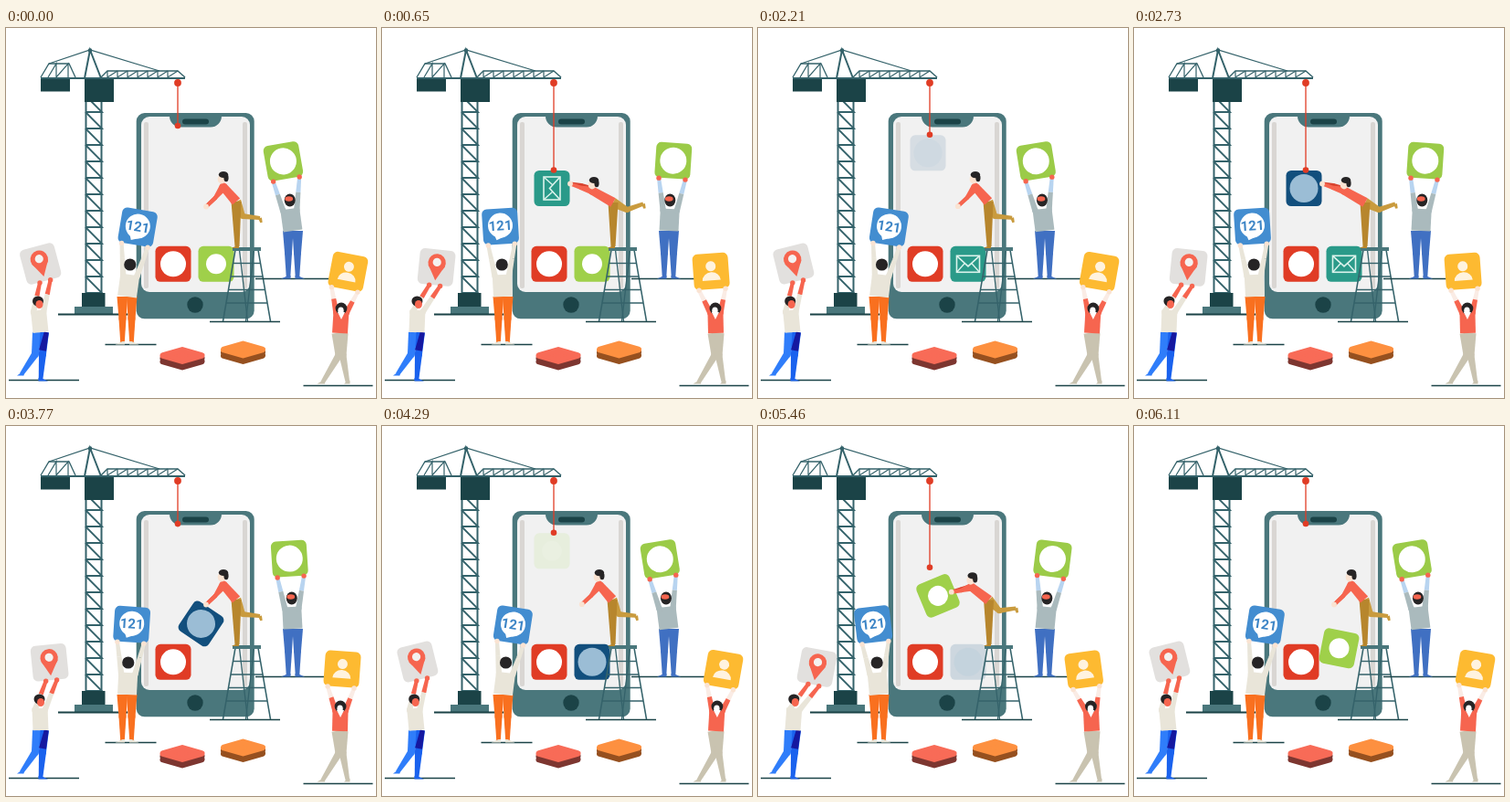
An HTML page with a canvas that plays this animation: 405 px wide and 405 px high, repeating every 6.24 s.

```html
<!DOCTYPE html>
<html lang="en">
<head>
<meta charset="utf-8">
<title>App building site</title>
<style>
  html, body { margin: 0; width: 100%; height: 100%; overflow: hidden; background: #fff; }
  canvas { display: block; width: 405px; height: 405px; }
</style>
</head>
<body>
<canvas id="stage"></canvas>
<script>
const SIZE = 405, STEP = 130, CYCLE = 2080, LOOP = 3 * CYCLE;
const STEEL = '#34626a', DARK = '#1b4347', BODY = '#4a777c';
const RED = '#e03c25', CORAL = '#f6654f', CREAM = '#e9e5d9', SKIN = '#fae3d2', BLACK = '#262425';

const canvas = document.getElementById('stage');
const g = canvas.getContext('2d');
const dpr = window.devicePixelRatio || 1;
canvas.width = canvas.height = SIZE * dpr;

// ---- drawing helpers ----
function trace(pts) {
  g.beginPath();
  for (let i = 0; i < pts.length; i += 2) g.lineTo(pts[i], pts[i + 1]);
}
function poly(color, ...pts) {
  trace(pts);
  g.fillStyle = color;
  g.fill();
}
function line(color, width, ...pts) {
  trace(pts);
  g.strokeStyle = color;
  g.lineWidth = width;
  g.stroke();
}
function rect(color, x, y, w, h, r = 0) {
  g.beginPath();
  g.roundRect(x, y, w, h, r);
  g.fillStyle = color;
  g.fill();
}
function oval(color, x, y, rx, ry = rx, from = 0, to = 2 * Math.PI) {
  g.beginPath();
  g.ellipse(x, y, rx, ry, 0, from, to);
  g.fillStyle = color;
  g.fill();
}
// Tapered limb through joints [x, y, width]
function chain(color, ...joints) {
  joints.slice(1).forEach(([x2, y2, w2], i) => {
    const [x1, y1, w1] = joints[i];
    const len = 2 * Math.hypot(x2 - x1, y2 - y1);
    const nx = (y1 - y2) / len, ny = (x2 - x1) / len;
    if (i) oval(color, x1, y1, w1 / 2);
    poly(color, x1 + nx * w1, y1 + ny * w1, x2 + nx * w2, y2 + ny * w2,
      x2 - nx * w2, y2 - ny * w2, x1 - nx * w1, y1 - ny * w1);
  });
}
function at(x, y, deg, paint) {
  g.save();
  g.translate(x, y);
  g.rotate(rad(deg));
  paint();
  g.restore();
}

// ---- motion helpers ----
const rad = deg => deg * Math.PI / 180;
const mix = (a, b, k) => a + (b - a) * k;
function ramp(from, to, t) {
  const u = Math.min(1, Math.max(0, (t - from) / (to - from)));
  return u * u * (3 - 2 * u);
}
// Point at a distance above a pivot, turned clockwise
const above = (x, y, r, deg) => [x + r * Math.sin(rad(deg)), y - r * Math.cos(rad(deg))];

// ---- app tiles ----
const disc = (r, color = '#fff') => () => oval(color, 0, 0, r);
function envelope() {
  const ink = '#dcf3ec';
  g.strokeStyle = ink;
  g.lineWidth = 1.6;
  g.strokeRect(-12.5, -9, 25, 18);
  line(ink, 1.6, -12, -8.5, 0, 2.5, 12, -8.5);
  for (const side of [-1, 1]) line(ink, 1.4, side * 12, 8.5, side * 3.5, -1);
}
function pin() {
  oval(CORAL, 0, -5, 9.7);
  poly(CORAL, -9.2, -2, 9.2, -2, 0, 14.5);
  oval('#f4f2f0', 0, -5.5, 4.6);
}
function user() {
  oval('#fff3df', 0, -5.5, 5.5);
  oval('#fff3df', 0, 10, 10, 9, Math.PI);
}
function chat() {
  oval('#fff', 0, -1, 13.5);
  poly('#fff', -8, 7, 5, 11, -5, 15);
  g.fillStyle = '#3d85c6';
  g.font = 'bold 15px Roboto, Arial, sans-serif';
  g.textAlign = 'center';
  g.textBaseline = 'middle';
  g.fillText('121', 0, 0);
}
const apps = [
  { color: '#2a9a89', icon: envelope },
  { color: '#124f7d', icon: disc(15.5, '#9bbdd5') },
  { color: '#9fd04a', icon: disc(11) }
];
function tile({ color, icon }, x, y, deg = 0, alpha = 1) {
  at(x, y, deg, () => {
    g.globalAlpha = alpha;
    rect(color, -19.5, -19.5, 39, 39, 5.5);
    icon();
  });
}

// ---- scenery ----
function crane() {
  line(STEEL, 1.3, 47, 39, 92, 24, 168, 47);
  line(STEEL, 2, 86, 55, 92, 24, 104, 55);
  oval(STEEL, 92, 24.5, 2.3);
  // counter-jib and jib
  line(STEEL, 1.3, 38, 54, 47, 39, 69, 39, 76, 54);
  line(STEEL, 1.2, 46, 54, 55, 39, 55, 54, 68, 39, 68, 54);
  line(STEEL, 1.4, 104, 54, 111, 47, 188, 47, 196, 54);
  for (let x = 111; x < 188; x += 11) line(STEEL, 1.2, x, 47, x, 54, x + 11, 47);
  line(STEEL, 2, 38, 55, 196, 55);
  rect(DARK, 38, 56, 32, 13.5);
  // mast
  for (const x of [87.5, 104.5]) line(STEEL, 2, x, 80, x, 291);
  for (let y = 74; y < 290; y += 18) line(STEEL, 1.8, 87, y, 105, y + 18, 87, y + 18);
  rect(DARK, 86, 56, 32, 25);
  rect(BODY, 75, 305, 42, 9);
  rect(DARK, 83, 290, 25.5, 15);
  line(DARK, 1.8, 57, 313.5, 133, 313.5);
}

function phone() {
  rect(BODY, 142.7, 93, 129, 225.3, 9);
  rect('#f1f1f1', 148, 97, 119, 192, 9);
  for (const x of [151, 259]) rect('#d9d6d3', x, 103, 5, 182, 2);
  rect(BODY, 179, 90, 57, 18.5, [0, 0, 12, 12]);
  rect('#fff', 179, 88, 57, 5);
  rect(DARK, 193, 99.5, 29, 6, 3);
  oval(DARK, 207, 303, 8.7);
}

function ladder() {
  const mid = 263.5;
  for (const side of [-1, 1]) {
    line(STEEL, 1.5, mid + side * 12.5, 243, mid + side * 26, 321);
    line(STEEL, 1.3, mid + side * 8, 243, mid - side * 1, 321);
  }
  for (let y = 257.5; y < 310; y += 14.5) {
    const half = mix(12.5, 26, (y - 243) / 78);
    line(STEEL, 1.4, mid - half, y, mid + half, y);
  }
  rect(BODY, 248, 240, 31, 4);
  line(DARK, 1.5, 223, 321.5, 300, 321.5);
}

function slab(x, y, top, side) {
  g.lineJoin = 'round';
  for (const [color, drop] of [[side, 6.5], [side, 3], [top, 0]]) {
    at(x, y + drop, 0, () => {
      poly(color, -21, 0, 0, -6, 21, 0, 0, 6);
      g.closePath();
      g.lineWidth = 7;
      g.strokeStyle = color;
      g.stroke();
    });
  }
  g.lineJoin = 'miter';
}

// ---- people who hold up a tile ----
// x, waist: middle of the hips; reach, rest: where the tile is held; amp, lean: swing of tile and chest
// legs: [knee x, foot x, foot y, toe length] from the hips; the back leg comes first
const standing = [[-5, -5, 51, -8], [5, 5, 51, 8]];
const people = [
  {
    x: 38, waist: 333, hip: 17, reach: 62, rest: 14.7, amp: -15, lean: -2.5, grip: 6, head: 33,
    cloth: CREAM, fore: CORAL, palm: CORAL, pants: ['#2f7dfa', '#1a62ee'], thigh: '#1518a0',
    legs: [[-6, -21, 46, -5], [2, 0, 52, 8]], ground: [-35, 42],
    app: { color: '#e2e0de', icon: pin },
    face() {
      oval(BLACK, -0.5, -1, 6, 5.5);
      oval(CORAL, 1, 2.5, 4, 4.5);
    }
  },
  {
    x: 132.5, waist: 294, hip: 21, reach: 64, rest: 1, amp: 9.5, lean: 3.3, grip: 14.5, head: 35,
    cloth: CREAM, fore: CREAM, palm: SKIN, pants: ['#f9701f', '#f9701f'], shoe: CREAM,
    legs: standing, ground: [-24, 32],
    app: { color: '#438dd0', icon: chat },
    face: disc(6.6, BLACK)
  },
  {
    x: 314, waist: 222, hip: 21, reach: 64, rest: 0.5, amp: -10, lean: -3.3, grip: 14.5, head: 33.5,
    cloth: '#aababd', fore: '#b8d4f0', palm: CORAL, pants: ['#4070c2', '#4070c2'],
    legs: standing, ground: [-41, 52],
    app: { color: '#9bcb48', icon: disc(14.5) },
    face() {
      oval(BLACK, 0, 0, 6, 7);
      oval(CORAL, -1, -1.5, 4.4, 2.8);
    }
  },
  {
    x: 365.5, waist: 334, hip: 17, reach: 55, rest: -1.5, amp: 10.8, lean: 1.5, grip: 14.5, head: 27,
    cloth: CORAL, fore: '#faece5', palm: SKIN, pants: ['#c9c3b0', '#c9c3b0'],
    legs: [[-1, -19, 54, -6], [3, 8.5, 54, -4]], ground: [-40, 36],
    app: { color: '#fdba31', icon: user },
    face() {
      oval(BLACK, 0, 0, 6.4);
      oval('#fff', -0.5, 2.5, 3.2, 4);
      poly('#fff', -4, 4, 4, 4, 0, 12);
    }
  }
];

function drawLeg(p, [knee, foot, footY, toe], front) {
  const hip = [p.x + (front ? 1 : -1) * p.hip / 4, p.waist, p.hip / 2 + 1];
  const bend = [p.x + knee, p.waist + 24, 8], end = [p.x + foot, p.waist + footY, 4.5];
  const color = p.pants[+front];
  chain(color, hip, bend, end);
  if (front && p.thigh) chain(p.thigh, [hip[0] + 2, hip[1], 5], [bend[0], bend[1] - 4, 8]);
  const heel = end[0] - Math.sign(toe) * 2.5;
  poly(p.shoe || color, heel, end[1] - 2, end[0], end[1] - 2, end[0] + toe, end[1] + 1.5, heel, end[1] + 1.5);
}

function drawPerson(p, swing) {
  const angle = p.amp * swing, chest = p.x + p.lean * swing;
  const [tx, ty] = above(p.x, p.waist - 13, p.reach, p.rest + angle);
  const c = Math.cos(rad(angle)), s = Math.sin(rad(angle));
  const groundY = p.waist + 52.5 + (p.reach < 60 ? 5 : 0);

  line(DARK, 1.7, p.x + p.ground[0], groundY, p.x + p.ground[1], groundY);
  p.legs.forEach((leg, i) => drawLeg(p, leg, i > 0));
  tile(p.app, tx, ty, angle);
  chain(p.cloth, [chest, p.waist - 24, p.hip], [p.x, p.waist, p.hip]);
  for (const side of [-1, 1]) {
    const gx = side * p.grip, gy = 20;
    const hand = [tx + gx * c - gy * s, ty + gx * s + gy * c, 4];
    const shoulder = [chest + side * (p.hip / 2 - 3), p.waist - 22, 6.5];
    const elbow = shoulder.map((v, i) => mix(v, hand[i], 0.55));
    oval(p.cloth, shoulder[0], shoulder[1], 3.2);
    chain(p.fore, elbow, hand);
    chain(p.cloth, shoulder, elbow);
    oval(p.palm, hand[0], hand[1], 2.7);
  }
  at(chest, p.waist - p.head, 0, p.face);
}

// ---- worker on the ladder: k = 0 upright, k = 1 reaching out ----
function worker(k) {
  const joint = (x1, y1, x2, y2, w) => [mix(x1, x2, k), mix(y1, y2, k), w];
  const hip = joint(252, 190, 253, 191, 11);
  const shoulder = joint(238, 174, 230, 178, 9);
  const hand = joint(219, 195.5, 206, 170.5, 4);
  const elbow = joint(229, 186, 218, 175, 4.5);
  const ankle = joint(278, 208, 286, 192.5, 4);

  chain('#c99b3e', hip, joint(259, 206, 268, 199, 6), ankle);
  chain('#c99b3e', ankle, [ankle[0] + 1.5, ankle[1] + 5, 2.5]);
  chain('#b7862d', hip, [253, 239, 5]);
  poly('#b7862d', 255, 237, 255, 241, 247, 241);
  chain('#d8432f', [shoulder[0] + 2, shoulder[1] - 2, 4], [elbow[0], elbow[1] - 3 * k, 4], hand);
  oval(CORAL, shoulder[0], shoulder[1], 4.5);
  chain(CORAL, shoulder, hip);
  chain(CORAL, shoulder, elbow, hand);
  oval(SKIN, hand[0], hand[1], 2.9);
  at(mix(237, 231, k), mix(163, 169, k), 0, () => {
    oval(SKIN, -1, 2.5, 4.3, 5);
    oval(BLACK, 1, -2.5, 5.2, 3.6);
    oval(BLACK, 4, 1, 2.6, 4.2);
  });
}

function hook(y) {
  line(RED, 1.3, 188, 60, 188, y);
  oval(RED, 188, 60, 3.9);
  oval(RED, 188, y, 3.3);
}

function draw(time) {
  const t = time % CYCLE, n = Math.floor(time / CYCLE);
  const swing = Math.cos(2 * Math.PI * t / CYCLE);
  const hookY = 107 + 48.5 * (ramp(0, 450, t) - ramp(1270, 1700, t));
  const u = Math.max(0, (t - 1040) / 1040);

  g.setTransform(dpr, 0, 0, dpr, 0, 0);
  g.fillStyle = '#fff';
  g.fillRect(0, 0, SIZE, SIZE);

  phone();
  crane();
  tile({ color: RED, icon: disc(14) }, 183, 258.3);
  tile(apps[(n + 2) % 3], 230, 258.3, 0, 1 - ramp(1000, 1400, t));
  // the new tile hangs on the hook, then is swung into the free slot
  if (u) tile(apps[n], mix(186, 230, u), mix(175.5, 258.3, u ** 1.5), 90 * (1 - u));
  else tile(apps[n], 186, hookY + 20, 90, ramp(60, 380, t));
  hook(hookY);
  ladder();
  worker(ramp(100, 520, t) - ramp(1040, 1600, t));
  slab(193, 358.5, '#f86b57', '#7d3630');
  slab(259.5, 352, '#fd9040', '#96501f');
  for (const p of people) drawPerson(p, swing);
}

const start = performance.now();
function tick() {
  const time = (performance.now() - start) % LOOP;
  draw(Math.floor(time / STEP) * STEP);
  requestAnimationFrame(tick);
}
tick();
</script>
</body>
</html>
```
